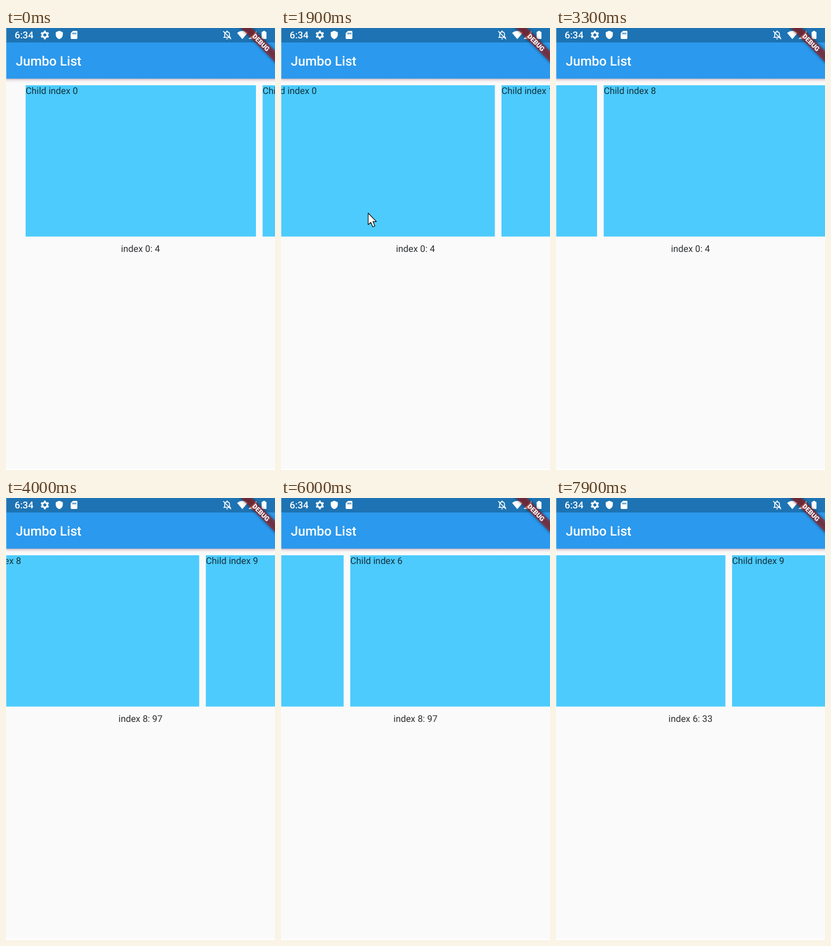
An HTML page for the animation above (8 s loop, 466x764 px).

```html
<!DOCTYPE html>
<html lang="en">
<head>
<meta charset="utf-8">
<title>Jumbo List</title>
<style>
  html, body { margin: 0; width: 100%; height: 100%; overflow: hidden; background: #fafafa; }
  svg { display: block; width: 466px; height: 764px; }
  text { font-family: Roboto, sans-serif; text-rendering: geometricPrecision; }
  .body { font-size: 15.9px; fill: #2b2e31; }
  .card text { fill: #14303c; }
</style>
</head>
<body>
<svg viewBox="0 0 466 764" xmlns="http://www.w3.org/2000/svg">
  <defs>
    <linearGradient id="shade" x2="0" y2="1">
      <stop offset="0" stop-color="#6d5a70" stop-opacity=".5"/>
      <stop offset=".35" stop-color="#b58a9c" stop-opacity=".27"/>
      <stop offset="1" stop-color="#f5dfe6" stop-opacity="0"/>
    </linearGradient>
    <filter id="blur" x="-20%" y="-80%" width="140%" height="260%">
      <feGaussianBlur stdDeviation="2.6"/>
    </filter>
  </defs>

  <rect width="466" height="764" fill="#fafafa"/>
  <rect y="762" width="466" height="2" fill="#fff"/>
  <g id="cards"></g>
  <text id="label" class="body" x="233" y="386.5" text-anchor="middle"></text>

  <rect y="87" width="466" height="8" fill="url(#shade)"/>
  <rect y="25" width="466" height="62.5" fill="#2b99ed"/>
  <rect width="466" height="25" fill="#1d73b3"/>
  <text x="17" y="65" font-size="22.7" font-weight="500" fill="#fff">Jumbo List</text>

  <g fill="#fff">
    <text x="15" y="18" font-size="16.6" font-weight="500">6:34</text>
    <g fill="none" stroke="#fff">
      <circle cx="67.3" cy="12" r="4.2" stroke-width="3"/>
      <circle cx="67.3" cy="12" r="6.3" stroke-width="2.2" pathLength="60" stroke-dasharray="5 5" stroke-dashoffset="7.5"/>
    </g>
    <path d="M92.3 4.8 L98.4 7.3 V11.5 C98.4 15 96 18 92.3 19.2 C88.6 18 86.2 15 86.2 11.5 V7.3 Z"/>
    <path fill-rule="evenodd" d="M116 5 H122.3 Q123.6 5 123.6 6.4 V17.6 Q123.6 19 122.3 19 H113.4 Q112 19 112 17.6 V9 Z
      M115.3 8 V11 H116.7 V8 Z M117.7 8 V11 H119.1 V8 Z M120.1 8 V11 H121.5 V8 Z"/>
    <g fill="none" stroke="#fff" stroke-width="1.5">
      <path d="M378.8 16 V11 C378.8 8.4 380.3 6.8 383 6.8 C385.7 6.8 387.2 8.4 387.2 11 V16 M376.5 16.3 H389.5 M376.3 5.5 L390 19.3"/>
      <path d="M383 4.2 V7 M381.7 18.8 H384.3"/>
    </g>
    <path d="M400.3 8.4 Q409.4 1.6 418.5 8.4 L409.4 19.3 Z"/>
    <path d="M434 5 V19 H420 Z"/>
    <path d="M445.2 5 H448.8 V6.5 H450.2 Q451.2 6.5 451.2 7.5 V18 Q451.2 19 450.2 19 H443.8 Q442.8 19 442.8 18 V7.5 Q442.8 6.5 443.8 6.5 H445.2 Z"/>
  </g>

  <g transform="translate(469 -2) rotate(45)">
    <rect x="-60" y="31.7" width="120" height="13.6" opacity=".5" filter="url(#blur)"/>
    <rect x="-60" y="31.7" width="120" height="13.6" fill="#b71c1c" fill-opacity=".55"/>
    <text y="42.6" font-size="11.5" font-weight="900" fill="#fff" text-anchor="middle">DEBUG</text>
  </g>
  <rect width="1" height="764" fill="#fff" opacity=".45"/>

  <path id="cursor" d="M0 0 V20 L4.6 16 L8 23.8 L11.6 22.2 L8.3 14.6 H14.3 Z" fill="#fff" stroke="#111" stroke-width="1.2" stroke-linejoin="round"/>
</svg>
<script>
const LOOP = 8000, STEP = 100;
const LEFT = 34, PITCH = 410.5, WIDTH = 399;
const NS = "http://www.w3.org/2000/svg";
const el = id => document.getElementById(id);

const drag = u => u ** 3;
const fling = u => (1.2 * u ** 3 - 3.27 * u * u + 3.065 * u) / 0.995;
const snap = u => u * u * (3 - 2 * u);

// start ms, end ms, from item, to item, easing
const moves = [
  [1791, 1965, 0, 0.62, drag],
  [1965, 3950, 0.62, 8.247, fling],
  [3950, 4430, 8.247, 8, snap],
  [5130, 5248, 8, 7.72, drag],
  [5248, 6320, 7.72, 5.71, fling],
  [6320, 6780, 5.71, 6, snap],
  [7300, 7498, 6, 6.3, drag],
  [7498, 8780, 6.3, 9.3, fling]
];

const labels = [[0, "index 0: 4"], [3950, "index 8: 97"], [6320, "index 6: 33"]];

function make(tag, attrs, parent) {
  const node = document.createElementNS(NS, tag);
  for (const key in attrs) node.setAttribute(key, attrs[key]);
  return parent.appendChild(node);
}

const cards = Array.from({ length: 11 }, (_, i) => {
  const g = make("g", { class: "card" }, el("cards"));
  make("rect", { y: 99, width: WIDTH, height: 261.5, fill: "#4dcbfd" }, g);
  make("text", { class: "body", y: 113.5 }, g).textContent = "Child index " + i;
  return g;
});

function scrollAt(t) {
  let pos = 0;
  for (const [start, end, from, to, ease] of moves) {
    if (t < start) break;
    pos = from + (to - from) * ease(Math.min(1, (t - start) / (end - start)));
  }
  return pos;
}

function cursorAt(t) {
  if (t < 900 || t >= 2000) return null;
  if (t >= 1800) return [392 - 2.41 * (t - 1800), 320];
  const u = snap(Math.min(1, (t - 900) / 700));
  return [417 - 25 * u, 378 - 58 * u];
}

function draw(t) {
  const pos = scrollAt(t);
  cards.forEach((g, i) => {
    const x = LEFT + (i - pos) * PITCH;
    g.setAttribute("transform", `translate(${x.toFixed(2)} 0)`);
    g.setAttribute("display", x > -WIDTH && x < 466 ? "inline" : "none");
  });
  el("label").textContent = labels.filter(([start]) => t >= start).pop()[1];
  const tip = cursorAt(t);
  el("cursor").setAttribute("display", tip ? "inline" : "none");
  if (tip) el("cursor").setAttribute("transform", `translate(${tip[0]} ${tip[1]})`);
}

let origin;
function tick(now) {
  origin ??= now;
  const t = (now - origin) % LOOP;
  draw(Math.floor(t / STEP) * STEP);
  requestAnimationFrame(tick);
}
draw(0);
requestAnimationFrame(tick);
</script>
</body>
</html>
```
